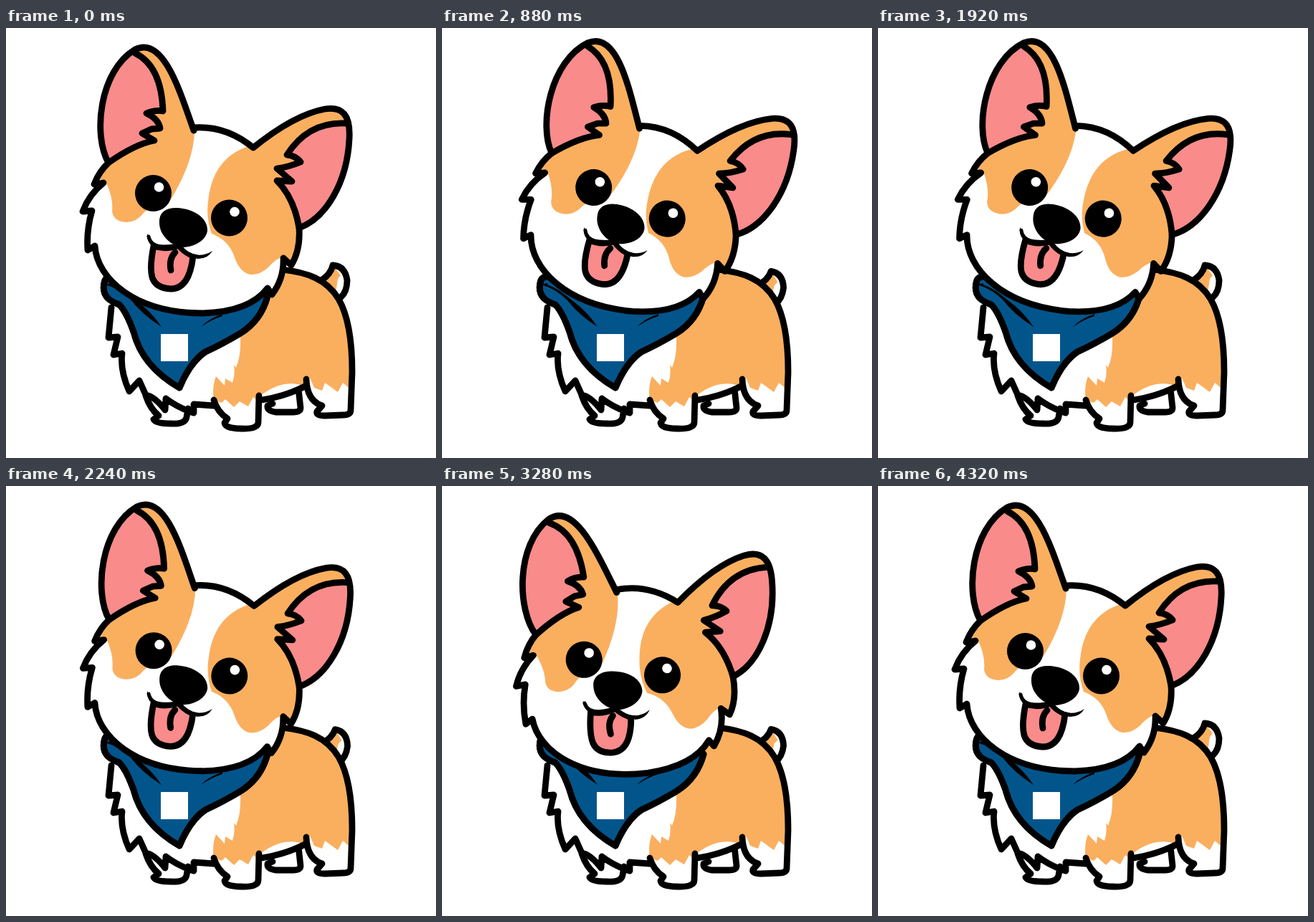
Recreate the animation shown at these times as an HTML page. Size 600 px wide and 600 px high, loop 4.4 s.

```html
<!DOCTYPE html>
<html lang="en">
<head>
<meta charset="utf-8">
<title>Corgi</title>
<style>
  html, body { margin: 0; width: 100%; height: 100%; overflow: hidden; background: #fff; }
  svg { display: block; width: 100%; height: 100%; }
  .line { fill: none; stroke: #000; stroke-width: 8.8; stroke-linecap: round; stroke-linejoin: round; }
  .thin { stroke-width: 5; }
  .fur { fill: #faaf5f; }
  .pink { fill: #f98b8b; }
  .white { fill: #fff; }
  .blue { fill: #02558b; }
</style>
</head>
<body>
<svg viewBox="0 0 600 600">
  <g id="tail">
    <path class="white" d="M440 352Q453 344 456 331Q473 333 476 352Q477 368 467 377L440 377Z"/>
    <path class="fur" d="M440 352Q453 344 456 331L467 345L463 350L461 364L456 372Z"/>
    <path class="line" d="M440 352Q453 344 456 331Q473 332 476 352Q476 368 467 376"/>
  </g>

  <g id="body">
    <path class="line" d="M408 503L411 530Q411 536 400 536L376 536Q364 534 365 527L372 524"/>
    <path class="white" d="M385 337C420 341 447 350 464 378C478 402 483 440 483 480L481 535L440 541Q420 520 419 500L357 519L352 555L309 557L290 519Z"/>
    <path class="fur" d="M340 337H385C420 341 447 350 464 378C478 402 483 440 483 480L483 506L470 495L463 508L445 495L441 506L430 502L424 488L417 500C400 493 378 495 355 513L351 520L345 515L338 528L326 521L318 529L306 518L301 523L290 519Q287 502 293 486L305 499L306 489L316 495Q320 484 318 470L321 474Q328 458 327 432L300 430Z"/>
    <path class="line" d="M385 337C420 341 447 350 464 378C478 402 483 440 483 480L481 533Q481 540 470 540L445 541Q432 541 434 535L441 527Q420 520 419 490M417 500Q390 514 357 519M290 519Q295 536 309 545L305 551Q306 559 328 559Q352 560 352 550L353 513M195 513Q201 531 213 541L206 546Q209 552 230 552Q250 553 252 543L254 531M147 390L143 432L156 431L150 456L162 454Q159 478 172 507L186 492L195 512Q207 514 222 533L223 517Q240 530 262 537L262 525L290 527"/>
  </g>

  <g id="bandana">
    <path id="cloth" class="blue" d="M138 352Q133 367 142 377Q147 382 158 386Q168 396 178 424Q190 472 242 502Q257 466 278 452Q302 441 327 426Q356 408 365 374L357 366L300 385L200 375L148 347Q141 346 138 352Z"/>
    <use href="#cloth" class="line"/>
    <path class="line" d="M138 352Q133 367 142 377Q147 382 158 386Q168 396 178 424Q190 472 242 502Q257 466 278 452Q302 441 327 426Q356 408 365 374L357 366L300 385L200 375L148 347Q141 346 138 352Z"/>
    <path d="M139 358Q160 365 174 379Q190 400 217 417Q202 395 184 382L150 355Z"/>
    <path class="blue" d="M147 354L178 368L200 385L182 380Q165 365 147 358Z"/>
    <path d="M302 399Q282 406 272 417Q286 407 302 402Z"/>
    <rect class="white" x="216" y="427" width="38" height="38"/>
  </g>

  <g id="head">
    <path class="white" d="M143 188L123 218L136 216Q116 232 107 256L120 255Q112 282 114 310L124 304C127 350 180 398 275 398Q340 396 365 363L371 372Q388 350 387 321L398 331Q411 310 409 279L345 167Q305 135 263 142Z"/>
    <path class="fur" d="M143 188C121 150 130 60 180 30C220 10 243 90 263 142Q263 185 230 239Q203 247 192 258Q182 271 168 271Q150 270 148 256Q150 238 140 216L131 212Z"/>
    <path class="fur" d="M338 165L345 167Q402 121 445 113C470 109 481 122 479 155C476 215 447 265 409 279Q411 310 398 331L387 319Q376 322 366 334Q354 345 341 344Q326 341 319 320Q311 296 287 287Q279 265 282 242Q288 182 338 165Z"/>
    <path class="pink" d="M143 188C121 150 130 65 180 35Q217 53 219 116L196 119L215 140L190 147L207 157Q180 162 143 188Z"/>
    <path class="pink" d="M477 133Q422 130 393 177L411 187L378 196L399 214L378 213Q402 237 409 279C447 265 476 215 479 155Z"/>
    <path class="line" d="M180 35Q217 53 219 116Q208 114 196 119Q213 127 215 140L203 141L190 147L207 157Q180 162 143 188C121 150 130 60 180 30C220 10 243 90 262 143M263 139Q307 136 345 167Q402 121 445 113C470 109 481 122 479 155C476 215 447 265 409 279Q402 237 378 213L399 214L378 196Q394 194 411 187Q404 178 392 177Q422 130 475 133"/>
    <path class="line" d="M143 188Q130 200 123 218L136 216Q116 232 107 256L120 255Q112 282 114 310L124 304C127 350 180 398 275 398Q340 396 365 363L371 372Q388 350 387 321L398 331Q411 310 409 279"/>

    <path class="pink" d="M206 304Q200 334 204 348Q209 363 230 364Q256 364 261 318Q248 312 241 303Q222 310 206 304Z"/>
    <path class="line" d="M206 304Q200 334 204 348Q209 363 230 364Q256 364 261 318Q248 312 241 303Q222 310 206 304Z"/>
    <path class="white" d="M206 298L210 302Q228 306 241 299Q252 315 268 317L270 300Z"/>
    <path class="line" d="M230 338Q227 322 236 313"/>
    <path class="line thin" d="M199 291Q202 305 220 305Q234 305 241 302Q251 317 267 319"/>
    <path d="M197 287Q203 300 210 303L206 306Q196 299 197 287ZM262 316Q276 319 288 311Q281 323 266 322Z"/>
    <path d="M214 270C214 256 225 250 240 251C265 253 282 267 281 283C279 297 262 306 245 306C228 303 213 287 214 270Z"/>
    <circle cx="205.500" cy="230.500" r="25.500"/>
    <circle cx="311.500" cy="265" r="25.500"/>
    <circle class="white" cx="213.500" cy="222" r="6.800"/>
    <circle class="white" cx="319" cy="256.500" r="6.800"/>
  </g>
</svg>
<script>
  const LOOP = 4400, WAG = 240, TILT_TIME = 400;
  const head = document.getElementById("head");
  const tail = document.getElementById("tail");

  // Each tilt: start time, change in degrees
  const tilts = [[0, 5], [1920, -5], [2880, -6.9], [3920, 6.9]];

  function ease(x) {
    x = Math.min(1, Math.max(0, x));
    return x * x * (3 - 2 * x);
  }

  function draw(now) {
    const t = now % LOOP;
    const tilt = tilts.reduce((sum, [start, turn]) => sum + turn * ease((t - start) / TILT_TIME), 0);
    const wag = 4.5 * (1 - Math.cos(2 * Math.PI * t / WAG));
    head.setAttribute("transform", `rotate(${tilt} 300 297)`);
    tail.setAttribute("transform", `rotate(${wag} 385 362)`);
    requestAnimationFrame(draw);
  }
  draw(performance.now());
</script>
</body>
</html>
```
